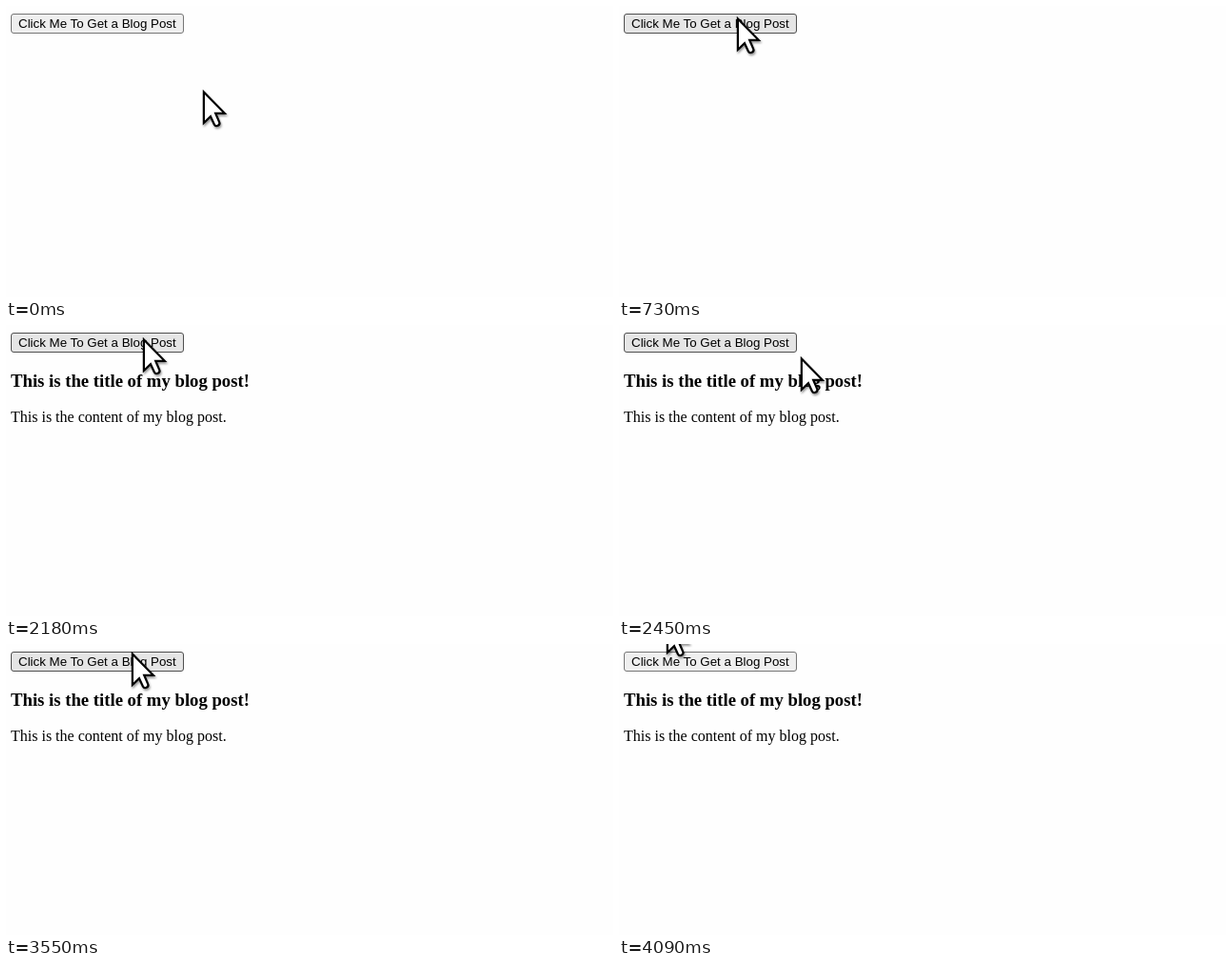
Write an HTML page that moves like this. It is 638 px wide and 306 px high and loops after 4.27 s.

```html
<!DOCTYPE html>
<html lang="en">
<head>
<meta charset="utf-8">
<title>Blog post button</title>
<style>
  html, body { margin: 0; width: 100%; height: 100%; overflow: hidden; background: #fefefe; }
  svg { display: block; }
  .label { font: 13.333px "Liberation Sans", Arial, sans-serif; }
  .title { font: bold 18.72px "Liberation Serif", "Times New Roman", serif; }
  .body { font: 16px "Liberation Serif", "Times New Roman", serif; }
  .pointer { filter: drop-shadow(1px 2px 1px rgba(0, 0, 0, .4)); }
  .rest { fill: #efefef; stroke: #767676; }
  .hover { fill: #e5e5e5; stroke: #4f4f4f; }
  .active { fill: #f5f5f5; stroke: #8d8d8d; }
</style>
</head>
<body>
<svg width="638" height="306" viewBox="0 0 638 306">
  <defs>
    <path id="bar" d="M-5 -13.5H5M0 -13.5V13.5M-5 13.5H5" stroke-linecap="square"/>
  </defs>
  <rect id="button" x="5.5" y="8.5" width="181" height="20" rx="2.5"/>
  <text class="label" x="13" y="23">Click Me To Get a Blog Post</text>
  <g id="post">
    <text class="title" x="5" y="65">This is the title of my blog post!</text>
    <text class="body" x="5" y="102">This is the content of my blog post.</text>
  </g>
  <g id="arrow" class="pointer">
    <path d="M.9 1.5V34L8 27.2L12 35.8Q13.2 37.8 15.6 36.8Q18.2 35.6 17.3 33.4L13.2 23.8H22.8Z"
      fill="#fff" stroke="#000" stroke-width="2.2"/>
  </g>
  <g id="beam" class="pointer">
    <use href="#bar" stroke="#000" stroke-width="6"/>
    <use href="#bar" stroke="#fff" stroke-width="2.2"/>
  </g>
</svg>
<script>
  const LOOP = 4270;
  const FRAME = 90.9; // the pointer is sampled about 11 times a second
  const get = id => document.getElementById(id);
  const button = get("button"), post = get("post"), arrow = get("arrow"), beam = get("beam");

  // Each move is a curve from one point to another, bent towards a third
  const moves = [
    { start: 0, end: 640, from: [207, 89], bend: [168, 57], to: [124, 12] },
    { start: 2090, end: 2640, from: [124, 12], bend: [186, 13], to: [213, 62] },
    { start: 3210, end: 3640, from: [213, 62], bend: [160, 16], to: [110, 0] },
    { start: 3640, end: 4090, from: [110, 0], bend: [-55, -20], to: [50, -25] }
  ];

  function pointerAt(t) {
    const { start, end, from, bend, to } = moves.filter(m => m.start <= t).pop();
    const p = Math.min(1, (t - start) / (end - start)), q = 1 - p;
    return from.map((v, i) => q * q * v + 2 * p * q * bend[i] + p * p * to[i]);
  }

  const show = (el, on) => el.setAttribute("visibility", on ? "visible" : "hidden");

  function draw(t) {
    const within = (a, b) => t >= a && t < b;
    const [x, y] = pointerAt(Math.floor((t + 6) / FRAME) * FRAME);
    const overText = within(2640, 3270);
    const pressed = within(1180, 1270);
    const hovered = within(550, 2550) || within(3460, 3640);
    button.setAttribute("class", pressed ? "active" : hovered ? "hover" : "rest");
    show(post, t >= 1360);
    show(arrow, !overText);
    show(beam, overText);
    (overText ? beam : arrow).setAttribute("transform",
      `translate(${Math.round(x)} ${Math.round(y) + (overText ? 0.5 : 0)})`);
  }

  const start = performance.now();
  function tick() {
    draw((performance.now() - start) % LOOP);
    requestAnimationFrame(tick);
  }
  tick();
</script>
</body>
</html>
```
